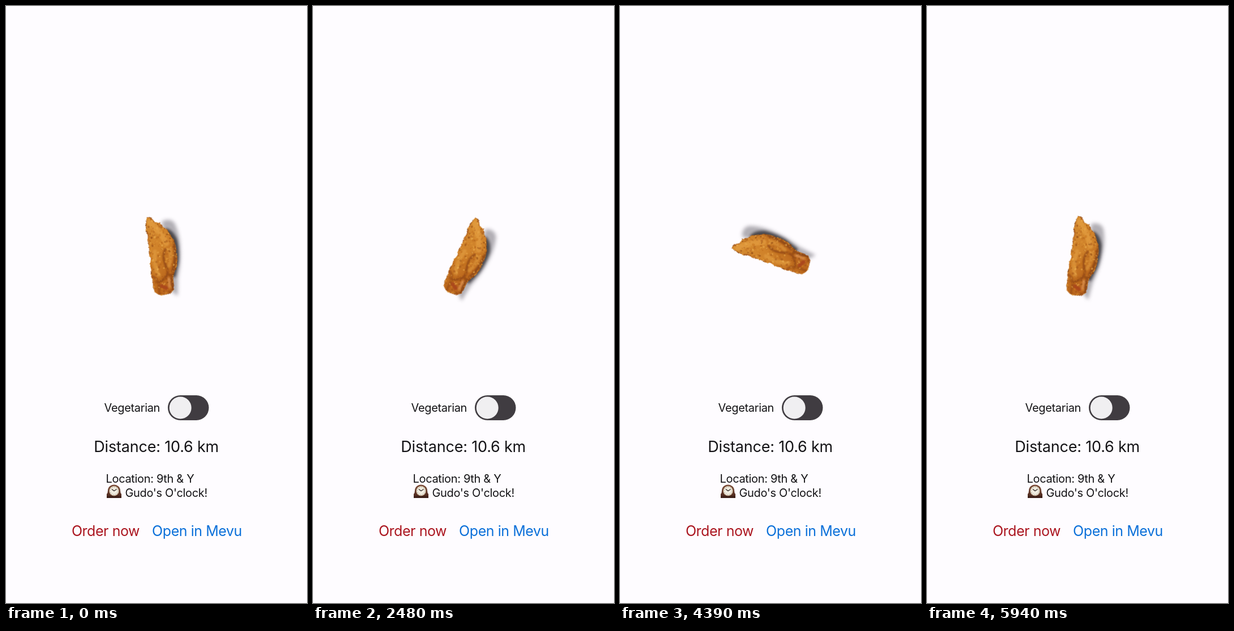
Animation of 532x1052 px, one loop 6000 ms. Source, as an HTML page:

```html
<!DOCTYPE html>
<html lang="en">
<head>
<meta charset="utf-8">
<title>Compass</title>
<style>
  html, body { margin: 0; width: 100%; height: 100%; overflow: hidden; background: #fefcff; }
  svg { display: block; width: 100%; height: 100%; }
  text { font-family: Inter, Roboto, sans-serif; fill: #141316; }
  .small { font-size: 20px; letter-spacing: -.33px; }
  .title { font-size: 27px; letter-spacing: -.2px; text-anchor: middle; }
  .link { font-size: 25px; letter-spacing: -.45px; text-anchor: middle; }

  #needle { transform-origin: 267px 441px; animation: heading 6s infinite; }
  /* Control points at 1/3 and 2/3 keep time even, so the turn rate runs on smoothly. */
  @keyframes heading {
    0%      { transform: rotate(-12.2deg); animation-timing-function: cubic-bezier(.333, .27, .667, .453); }
    27.333% { transform: rotate(0deg);     animation-timing-function: cubic-bezier(.333, .177, .667, 1); }
    41.333% { transform: rotate(18.8deg);  animation-timing-function: cubic-bezier(.333, 0, .667, .7); }
    63.167% { transform: rotate(-58.2deg); animation-timing-function: cubic-bezier(.333, .59, .667, 1); }
    73.167% { transform: rotate(-76deg);   animation-timing-function: cubic-bezier(.333, 0, .667, .903); }
    88.333% { transform: rotate(-8.4deg);  animation-timing-function: cubic-bezier(.333, .457, .667, .9); }
    99%, 100% { transform: rotate(2.4deg); }
  }
</style>
</head>
<body>
<svg viewBox="0 0 532 1052" preserveAspectRatio="none">
  <defs>
    <linearGradient id="crust" x1=".2" y1="0" x2=".6" y2="1">
      <stop offset="0" stop-color="#d38a30"/>
      <stop offset=".45" stop-color="#d0822a"/>
      <stop offset=".75" stop-color="#bd6a1e"/>
      <stop offset="1" stop-color="#b8621f"/>
    </linearGradient>
    <linearGradient id="wood" x1="0" y1="0" x2="0" y2="1">
      <stop offset="0" stop-color="#7a4a38"/>
      <stop offset="1" stop-color="#4a261b"/>
    </linearGradient>
    <filter id="soft" x="-60%" y="-30%" width="220%" height="160%"><feGaussianBlur stdDeviation="3.4"/></filter>
    <filter id="near" x="-60%" y="-30%" width="220%" height="160%"><feGaussianBlur stdDeviation="2.2"/></filter>
    <filter id="melt" x="-50%" y="-50%" width="200%" height="200%"><feGaussianBlur stdDeviation="1.3"/></filter>
    <clipPath id="inside"><use href="#strip"/></clipPath>
  </defs>

  <g id="needle">
    <path d="M288 383Q305 378 310 392Q315 416 309 442Q305 464 295 486L288 517L278 506L285 440Z" fill="#66626a" opacity=".5" filter="url(#soft)"/>
    <path d="M292 396Q304 400 308 420Q308 442 302 460L291 484L280 480L288 410Z" fill="#1d1a20" opacity=".7" filter="url(#near)"/>
    <polygon id="strip" fill="url(#crust)" points="264,371 268,371 272,375 276,382 284,385 287,392 294,399 298,410 302,422 303,432 301,443 300,455 298,463 292,473 287,481 285,494 283,505 276,509 266,510 257,508 250,502 249,492 251,482 250,472 252,462 252,452 256,443 254,434 257,425 257,414 259,403 258,392 260,381"/>
    <g id="rim"></g>
    <g clip-path="url(#inside)">
      <g filter="url(#melt)" fill="none" stroke-linecap="round">
        <path d="M302 424Q300 456 284 480L282 504" stroke="#7c3a10" stroke-width="5" opacity=".65"/>
        <path d="M267 380Q282 400 288 422" stroke="#e9a747" stroke-width="10" opacity=".55"/>
        <path d="M284 432Q274 444 279 462T262 486" stroke="#883f10" stroke-width="4" opacity=".7"/>
        <path d="M292 434Q291 450 284 462" stroke="#e09a3c" stroke-width="6" opacity=".6"/>
        <path d="M265 432Q257 462 263 474" stroke="#e29d40" stroke-width="7" opacity=".6"/>
        <path d="M252 474Q262 482 258 500T278 507" stroke="#93450f" stroke-width="4" opacity=".65"/>
        <path d="M264 494L271 499" stroke="#a63f1a" stroke-width="7" opacity=".75"/>
        <path d="M279 484L277 498" stroke="#e39a5c" stroke-width="4" opacity=".65"/>
      </g>
      <g id="crumbs"></g>
    </g>
  </g>

  <text class="small" x="173.5" y="714.5">Vegetarian</text>
  <rect x="286" y="686" width="72.5" height="44" rx="22" fill="#403c41"/>
  <circle cx="308.2" cy="708" r="19.5" fill="#f0eff1"/>

  <text class="title" x="265.7" y="785.5">Distance: 10.6 km</text>

  <text class="small" x="176.5" y="840">Location: 9th &amp; Y</text>
  <g>
    <path d="M178 867V860Q180 858 180 854A11 10.5 0 0 1 202 854Q202 858 204 860V867Z" fill="url(#wood)"/>
    <rect x="178" y="863.5" width="26" height="3.5" rx="1" fill="#3d2018"/>
    <circle cx="191" cy="854.5" r="9" fill="#a98a6a"/>
    <circle cx="191" cy="854.5" r="8" fill="#f1ecdf"/>
    <circle cx="191" cy="854.5" r="6.6" fill="none" stroke="#8d8579" stroke-width="1.2" stroke-dasharray=".9 2.56"/>
    <path d="M187 851.5L191 854.5L195.5 851.5" fill="none" stroke="#29211f" stroke-width="1.2"/>
  </g>
  <text class="small" x="210.5" y="864.5">Gudo's O'clock!</text>

  <text class="link" x="176" y="934" style="fill:#ab1620">Order now</text>
  <text class="link" x="337.5" y="934" style="fill:#0b70d9">Open in Mevu</text>
</svg>
<script>
  let seed = 11;
  const rand = () => (seed = seed * 16807 % 2147483647) / 2147483647;
  const byId = id => document.getElementById(id);
  const tones = ['#f0b555', '#e29c3a', '#bf6c1b', '#8c4410', '#a9581a', '#d98d2c'];

  function dot(group, x, y, r, opacity, tone) {
    const el = document.createElementNS('http://www.w3.org/2000/svg', 'ellipse');
    const set = { cx: x, cy: y, rx: r, ry: r * (.5 + rand() * .5), fill: tone, opacity,
      transform: `rotate(${rand() * 180} ${x} ${y})` };
    for (const key in set) el.setAttribute(key, set[key]);
    group.append(el);
  }

  // Crumbly texture across the surface
  for (let i = 0; i < 420; i++) {
    dot(byId('crumbs'), 246 + rand() * 60, 369 + rand() * 143, .6 + rand() * 1.9,
      .3 + rand() * .35, tones[Math.floor(rand() * tones.length)]);
  }

  // Rough edge
  const strip = byId('strip');
  const length = strip.getTotalLength();
  for (let d = 0; d < length; d += 2.6) {
    const p = strip.getPointAtLength(d);
    dot(byId('rim'), p.x + rand() - .5, p.y + rand() - .5, .8 + rand() * .9, .85,
      tones[2 + Math.floor(rand() * 4)]);
  }
</script>
</body>
</html>
```
